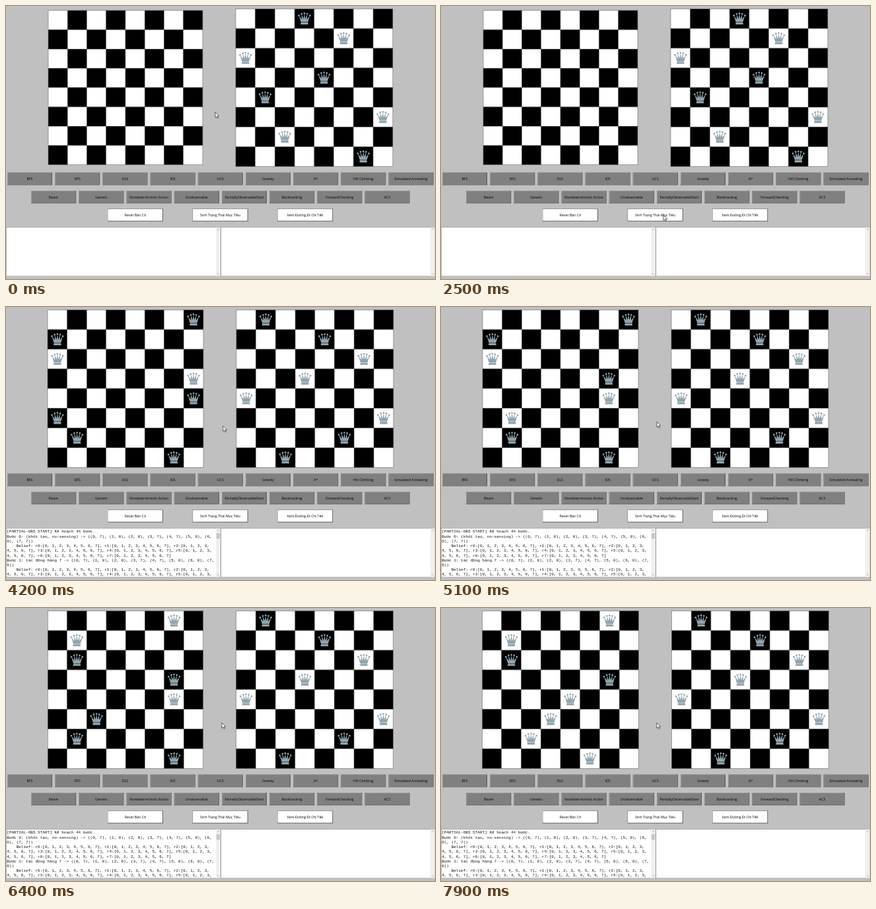
Animation, 650 px wide and 414 px high, one loop 8 s. Source, as an HTML page:

```html
<!DOCTYPE html>
<html lang="vi">
<head>
<meta charset="utf-8">
<title>Eight queens</title>
<style>
  html, body { margin: 0; width: 100%; height: 100%; overflow: hidden; background: #c0c0c0; }
  svg { display: block; width: 650px; height: 414px; }
  .ui { font: 5.25px "Open Sans", "Noto Sans", sans-serif; text-anchor: middle; fill: #000; }
  .log { font: 6.03px "Liberation Mono", "Courier New", monospace; fill: #111; }
</style>
</head>
<body>
<svg id="stage" viewBox="0 0 650 414">
  <defs>
    <g id="queen" fill="#90a4ae">
      <path d="M-5.4 5L-8.2 -4.4L-3.8 1L-4.3 -7.2L-1.3 .4L0 -7.8L1.3 .4L4.3 -7.2L3.8 1L8.2 -4.4L5.4 5Z"/>
      <path d="M-5.4 5.5H5.4L5.8 8.8H-5.8Z"/>
    </g>
  </defs>
</svg>
<script>
const LOOP = 8000, CELL = 29.25, ROOMY = 29.75, TALL = 29.88;
const stage = document.getElementById('stage');

function add(parent, tag, attrs, text) {
  const el = document.createElementNS('http://www.w3.org/2000/svg', tag);
  set(el, attrs);
  if (text) el.textContent = text;
  return parent.appendChild(el);
}
function set(el, attrs) {
  for (const k in attrs) el.setAttribute(k, attrs[k]);
}
const rect = (x, y, width, height, fill) => add(stage, 'rect', { x, y, width, height, fill });

function buttons(labels, x, y, pitch, w, fill) {
  labels.forEach((label, i) => {
    const cx = x + i * pitch;
    rect(cx - w / 2, y, w, 19, '#444');
    rect(cx - w / 2, y, w - .9, 18.1, '#b0b0b0');
    rect(cx - w / 2 + .6, y + .6, w - 1.5, 17.5, fill);
    add(stage, 'text', { class: 'ui', x: cx, y: y + 11.4 }, label);
  });
}

function textArea(x, w) {
  rect(x, 335, w, 75, '#8a8a8a');
  rect(x + .7, 335.7, w - 1.2, 73.8, '#fff');
  rect(x + w - 7, 335.7, 6.5, 73.8, '#f0f0f0');
  for (const side of [-1, 1])
    add(stage, 'path', { d: `M${x + w - 5.4} ${372.5 + side * 33}l1.6 ${side * 1.5}l1.6 ${-side * 1.5}`,
      fill: 'none', stroke: '#999', 'stroke-width': .7 });
}

// The queens' points: five balls on an arc
for (let i = -2; i <= 2; i++)
  add(document.getElementById('queen'), 'circle', { cx: i * 4.15, cy: -8 + .8 * i * i, r: 1.35 });

function makeBoard() {
  const cells = [], queens = [];
  for (let i = 0; i < 64; i++)
    cells.push(add(stage, 'rect', { fill: ((i >> 3) + i) % 2 ? '#000' : '#fff',
      stroke: '#666', 'stroke-width': .6 }));
  for (let r = 0; r < 8; r++) queens.push(add(stage, 'use', { href: '#queen' }));
  return { cells, queens };
}

// Columns that hold a queen are slightly wider; the board stays centred on cx.
function layBoard({ cells, queens }, cx, cols, fitted) {
  const widths = [...Array(8).keys()].map(c => fitted && cols.includes(c) ? ROOMY : CELL);
  const edges = [0];
  for (const w of widths) edges.push(edges.at(-1) + w);
  const h = fitted ? TALL : CELL, x0 = cx - edges[8] / 2, y0 = 123.8 - 4 * h;
  cells.forEach((el, i) => {
    const c = i % 8;
    set(el, { x: x0 + edges[c], y: y0 + (i >> 3) * h, width: widths[c], height: h });
  });
  queens.forEach((el, r) => {
    const c = cols[r];
    set(el, { visibility: cols.length ? 'visible' : 'hidden' });
    if (cols.length) set(el, { x: x0 + edges[c] + widths[c] / 2, y: y0 + (r + .5) * h });
  });
}

const left = makeBoard(), right = makeBoard();

buttons(['BFS', 'DFS', 'DLS', 'IDS', 'UCS', 'Greedy', 'A*', 'Hill Climbing', 'Simulated Annealing'],
  36, 252.5, 72.2, 68, '#808080');
buttons(['Beam', 'Genetic', 'Nondeterministic Action', 'Unobservable', 'PartiallyObservableStart',
  'Backtracking', 'ForwardChecking', 'AC3'], 72.2, 280.2, 72.2, 68, '#808080');
buttons(['Reset Bàn Cờ', 'Sinh Trạng Thái Mục Tiêu', 'Xem Đường Đi Chi Tiết'],
  196, 307.5, 128.6, 84, '#fff');
textArea(0, 325.3);
textArea(325.3, 324.7);

// Log output
const log = add(stage, 'g', { class: 'log' });
const all = '0, 1, 2, 3, 4, 5, 6, 7], ', head = '0, 1, 2, 3,', tail = '4, 5, 6, 7], ';
const belief = `${'\u00a0'.repeat(4)}Belief: r0:[${all}r1:[${all}r2:[${head}`;
const more = `${tail}r3:[${all}r4:[${all}r5:[${head}`;
const places = '((0, 7), (1, 0), (2, 0), (3, 7), (4, 7), (5, 0), (6,';
[
  '[PARTIAL-OBS START] Kế hoạch 44 bước.',
  `Bước 0: (khởi tạo, no-sensing) -> ${places}`,
  '0), (7, 7))',
  belief, more,
  `${tail}r6:[${all}r7:[${all.slice(0, -2)}`,
  `Bước 1: tác động hàng 7 -> ${places} 0), (7,`,
  '6))',
  belief, more
].forEach((s, i) => add(log, 'text', { x: 1.2, y: 342.4 + i * 7.22 }, s));
add(log, 'rect', { x: 318.8, y: 343, width: 5.4, height: 8.5, fill: '#c8c8c8' });

const pointer = add(stage, 'path', { d: 'M0 0V8.2L1.9 6.5L3.2 9.4L4.5 8.8L3.2 6H5.8Z',
  fill: '#fff', stroke: '#222', 'stroke-width': .7 });

const digits = s => [...s].map(Number);
const goals = ['35041726', '14630752'].map(digits);
const start = digits('70077007');
const rowOrder = '76543210-547654'; // '-' is a step without a move
const FIRST = 3920, STEP = 270.5;

// Each step brings one queen a column closer to the middle.
function queensAt(t) {
  if (t < 3500) return [];
  const cols = [...start];
  [...rowOrder].forEach((r, k) => {
    if (r !== '-' && t >= FIRST + k * STEP) cols[r] += cols[r] < 4 ? 1 : -1;
  });
  return cols;
}

// time, x, y
const path = [
  [0, 317, 161], [400, 322, 165], [1100, 324, 176], [1800, 324, 176], [2100, 314, 151],
  [2500, 337, 317], [2600, 337, 317], [3500, 361, 288], [3600, 361, 288], [4300, 327, 174],
  [LOOP, 327, 174]
];

function pointerAt(t) {
  const i = path.findIndex(p => p[0] > t);
  const [t0, x0, y0] = path[i - 1], [t1, x1, y1] = path[i];
  const u = (t - t0) / (t1 - t0), e = u * u * (3 - 2 * u);
  return [x0 + (x1 - x0) * e, y0 + (y1 - y0) * e];
}

function draw(now) {
  const t = Math.floor(now % LOOP / 100) * 100;
  const cols = queensAt(t), fitted = t >= 3700;
  const used = fitted ? new Set(cols).size : 0;
  layBoard(left, 181, cols, fitted);
  layBoard(right, 467 + used / 4, goals[t < 2700 ? 0 : 1], true);
  set(log, { visibility: t < 3600 ? 'hidden' : 'visible' });
  set(pointer, { transform: `translate(${pointerAt(t)})` });
}

const began = performance.now();
function tick() {
  draw(performance.now() - began);
  requestAnimationFrame(tick);
}
tick();
</script>
</body>
</html>
```
